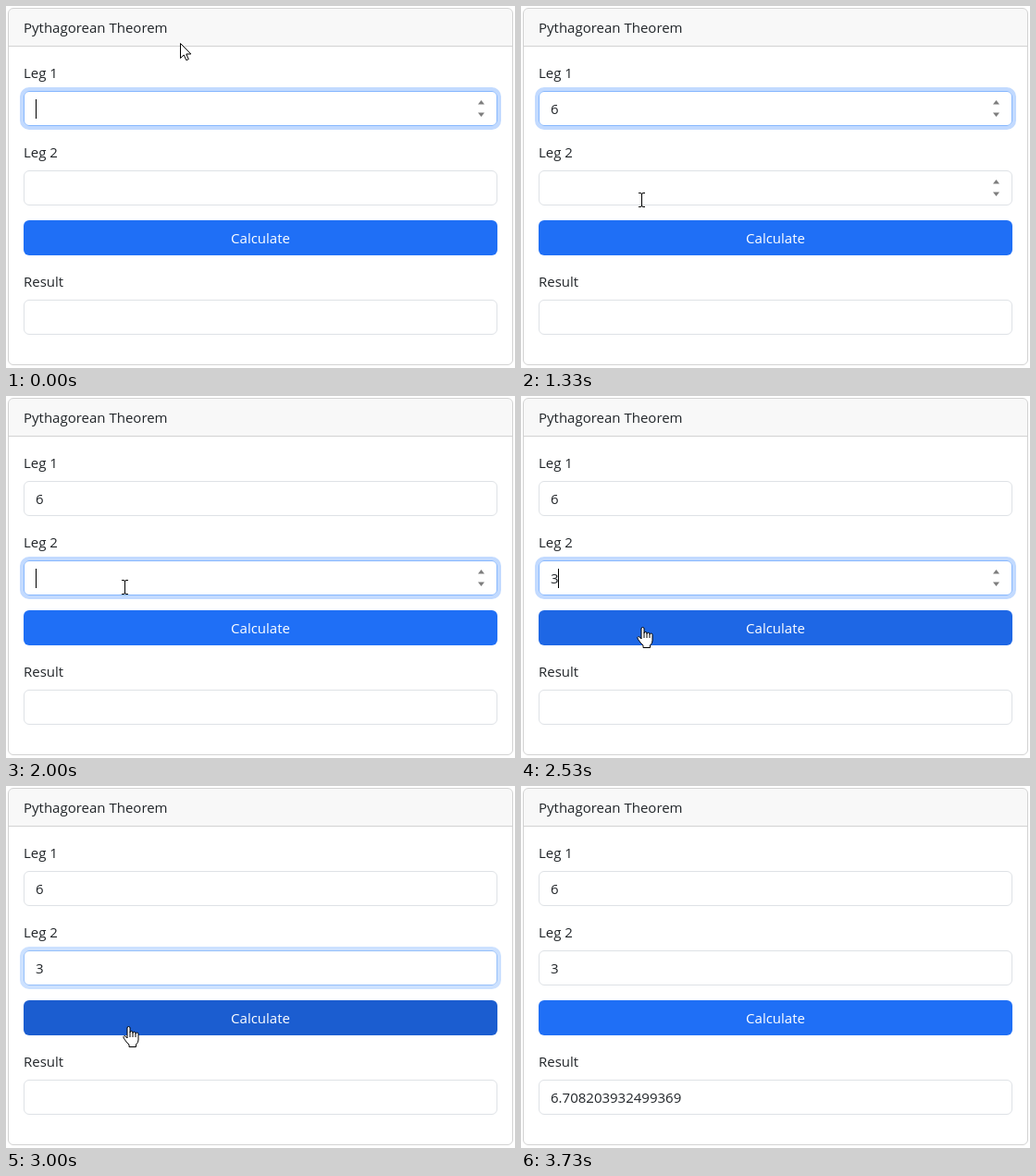
An HTML page with a canvas that plays this animation: 550 px wide and 392 px high, repeating every 4.34 s.

```html
<!DOCTYPE html>
<html lang="en">
<head>
<meta charset="utf-8">
<title>Pythagorean Theorem</title>
<style>
html, body { margin: 0; width: 100%; height: 100%; overflow: hidden; background: #fff; }
canvas { display: block; width: 550px; height: 392px; }
</style>
</head>
<body>
<canvas id="stage" width="550" height="392"></canvas>
<script>
const ctx = document.getElementById('stage').getContext('2d');
const LOOP = 4340, TICK = 1000 / 15, BLINK = 530, FADE = 150;
const LEFT = 19, WIDTH = 512, HEIGHT = 38;
const INK = '#212529';

// Moments of the interaction, in ms
const TYPE_1 = 800, FOCUS_2 = 1480, TYPE_2 = 2130, HOVER = 2460;
const PRESS = 2960, RELEASE = 3090, LEAVE = 3530, GONE = 3730;

// Pointer hot spot: time, x, y
const PATH = [
  [733, 188, 40], [867, 183, 62], [1000, 162, 128], [1133, 138, 194],
  [1200, 132, 212], [1333, 130, 210], [1467, 128, 207], [2000, 128, 207],
  [2267, 128, 213], [2400, 129, 228], [2467, 130, 240], [2600, 132, 260],
  [3467, 132, 260], [3533, 134, 285], [3600, 137, 322], [3733, 142, 400]
];

const ARROW = new Path2D('M.5 .5V16.5L4.2 13L6.8 18.7L9.3 17.6L6.8 12H11.8Z');
const HAND = new Path2D('M5 13V2a1.5 1.5 0 0 1 3 0V7a1.5 1.5 0 0 1 3 0v.8' +
  'a1.5 1.5 0 0 1 3 0v.8a1.5 1.5 0 0 1 3 0V15Q17 18 14.5 20V22.5H7V20' +
  'Q4 17.5 1.3 13.2Q.2 11.2 1.8 10.6Q3.3 10.3 5 13Z');
const KNUCKLES = new Path2D('M8 7V12M11 7.8V12M14 8.6V12');
const BEAM = new Path2D('M-3 -7.5H-1Q.5 -7.5 .5 -6V6Q.5 7.5 -1 7.5H-3' +
  'M4 -7.5H2Q.5 -7.5 .5 -6M4 7.5H2Q.5 7.5 .5 6');

function ease(from, t) {
  const u = Math.min(1, Math.max(0, (t - from) / FADE));
  return u * u * (3 - 2 * u);
}

function pointerAt(t) {
  let a = PATH[0];
  for (const b of PATH) {
    if (t < b[0]) {
      const u = b === a ? 0 : (t - a[0]) / (b[0] - a[0]);
      return [a[1] + (b[1] - a[1]) * u, a[2] + (b[2] - a[2]) * u];
    }
    a = b;
  }
  return [a[1], a[2]];
}

function mix(a, b, u) {
  return 'rgb(' + a.map((v, i) => Math.round(v + (b[i] - v) * u)).join() + ')';
}

function box(x, y, w, h, r) {
  ctx.beginPath();
  ctx.roundRect(x, y, w, h, r);
}

function text(s, x, y, color = INK, align = 'left') {
  ctx.font = '15px "Open Sans", "Noto Sans", sans-serif';
  ctx.textAlign = align;
  ctx.fillStyle = color;
  ctx.fillText(s, x, y);
}

function triangle(x, y, dy) {
  ctx.beginPath();
  ctx.moveTo(x - 3.5, y);
  ctx.lineTo(x + 3.5, y);
  ctx.lineTo(x, y + dy);
  ctx.fill();
}

function field(label, y, value, focus = 0, spinner = false, caret = false) {
  text(label, LEFT, y - 14);
  if (focus > 0) {
    ctx.strokeStyle = `rgba(13,110,253,${0.25 * focus})`;
    ctx.lineWidth = 4;
    box(LEFT - 2, y - 2, WIDTH + 4, HEIGHT + 4, 8);
    ctx.stroke();
  }
  ctx.lineWidth = 1;
  ctx.strokeStyle = mix([222, 226, 230], [134, 183, 254], focus);
  ctx.fillStyle = '#fff';
  box(LEFT + 0.5, y + 0.5, WIDTH - 1, HEIGHT - 1, 5.5);
  ctx.fill();
  ctx.stroke();
  text(value, 32, y + 25);
  if (spinner) {
    ctx.fillStyle = '#7d7d7d';
    triangle(513.5, y + 14.5, -4.5);
    triangle(513.5, y + 23.5, 4.5);
  }
  if (caret) {
    ctx.fillStyle = '#000';
    ctx.fillRect(value ? 40 : 32, y + 9, 1, 21);
  }
}

function card() {
  ctx.fillStyle = '#fff';
  ctx.fillRect(0, 0, 550, 392);
  ctx.fillStyle = '#f8f8f8';
  box(3, 3, 544, 40, [5, 5, 0, 0]);
  ctx.fill();
  ctx.fillStyle = '#d2d2d2';
  ctx.fillRect(3, 43, 544, 1);
  ctx.strokeStyle = '#d2d2d2';
  ctx.lineWidth = 1;
  box(2.5, 2.5, 545, 386, 5.5);
  ctx.stroke();
  text('Pythagorean Theorem', LEFT, 29);
}

function button(t) {
  const idle = [31, 111, 246], hover = [28, 94, 210], active = [25, 88, 200];
  let color = mix(idle, hover, ease(HOVER, t) - ease(LEAVE - 10, t));
  if (t >= PRESS && t < LEAVE - 10) {
    color = mix(hover, active, ease(PRESS, t) - ease(RELEASE, t));
  }
  ctx.fillStyle = color;
  box(LEFT, 232, WIDTH, HEIGHT, 6);
  ctx.fill();
  text('Calculate', 275, 257, '#fff', 'center');
}

function outline(path) {
  ctx.fillStyle = '#fff';
  ctx.strokeStyle = '#000';
  ctx.lineWidth = 1;
  ctx.fill(path);
  ctx.stroke(path);
}

function pointer(x, y) {
  const over = top => y >= top && y < top + HEIGHT;
  ctx.save();
  ctx.translate(Math.round(x), Math.round(y));
  if (over(232)) {
    ctx.translate(-6, 0);
    outline(HAND);
    ctx.stroke(KNUCKLES);
  } else if (over(92) || over(178) || over(318)) {
    ctx.strokeStyle = '#000';
    ctx.lineWidth = 1;
    ctx.stroke(BEAM);
  } else {
    outline(ARROW);
  }
  ctx.restore();
}

function blink(since, t) {
  return t >= since && Math.floor((t - since) / BLINK) % 2 === 0;
}

function draw(t) {
  const [x, y] = pointerAt(t);
  const over2 = y >= 178 && y < 216;
  const first = t < FOCUS_2, second = !first && t < PRESS;
  const caret1 = t < 200 || (t < TYPE_1 ? t >= 730 : blink(TYPE_1, t));
  const caret2 = t < TYPE_2 ? blink(FOCUS_2, t) : blink(TYPE_2, t);
  const shift = ease(FOCUS_2, t);

  card();
  field('Leg 1', 92, t < TYPE_1 ? '' : '6', 1 - shift, first, first && caret1);
  field('Leg 2', 178, t < TYPE_2 ? '' : '3', shift - ease(PRESS, t),
    second || over2, second && caret2);
  button(t);
  field('Result', 318, t < RELEASE ? '' : String(Math.hypot(6, 3)).slice(0, 17));
  if (t < GONE) pointer(x, y);
}

function frame(now) {
  const t = now % LOOP;
  draw(Math.floor((t + 4) / TICK) * TICK);
  requestAnimationFrame(frame);
}
draw(0);
requestAnimationFrame(frame);
</script>
</body>
</html>
```
